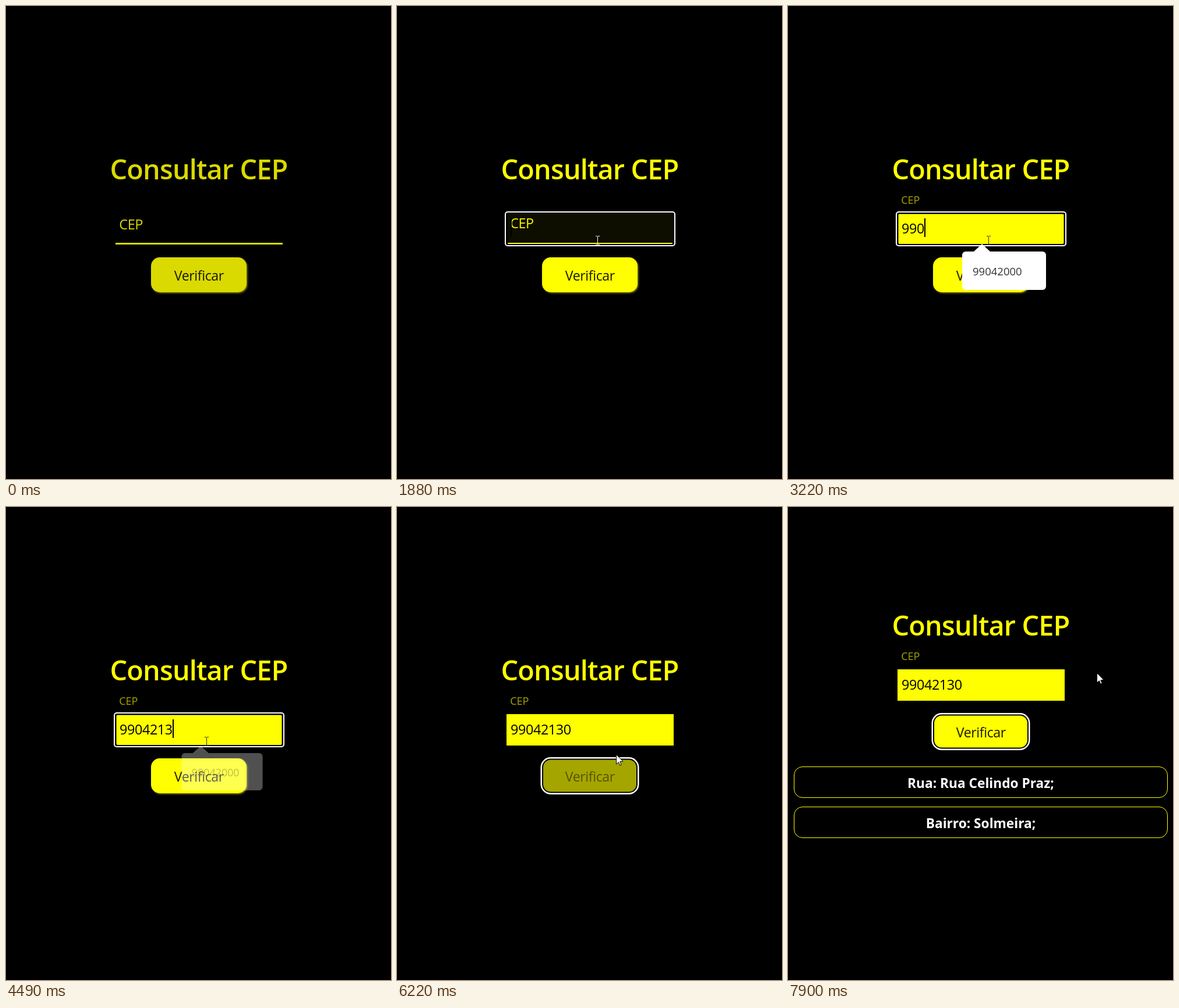
An HTML page with a canvas that plays this animation: 661 by 813 pixels, repeating every 8000 ms.

```html
<!DOCTYPE html>
<html lang="pt-BR">
<head>
<meta charset="utf-8">
<title>Consultar CEP</title>
<style>
  html, body { margin: 0; width: 100%; height: 100%; overflow: hidden; background: #000; }
  canvas { display: block; }
</style>
</head>
<body>
<canvas id="stage" width="661" height="813"></canvas>
<script>
const ctx = document.getElementById('stage').getContext('2d');
const LOOP = 8000;
const FOCUS = 1840, POPUP_OUT = 4350, CLICK = 5900, RESULT1 = 6930, RESULT2 = 7890;
const CODE = '99042130';
const KEYS = [2330, 2470, 3220, 3820, 3960, 4350, 4420, 4950];
const RESULTS = ['Rua: Rua Celindo Praz;', 'Bairro: Solmeira;'];

// pointer path: time, x, y
const PATH = [
  [60, 530, 785], [340, 404, 538], [540, 386, 476], [820, 344, 403],
  [5220, 344, 403], [5560, 350, 445], [6100, 350, 445], [6420, 419, 391],
  [6600, 441, 364], [6720, 462, 324], [6860, 473, 304], [6930, 473, 304], [7300, 530, 285]
];

const clamp = v => Math.min(1, Math.max(0, v));
const mix = (a, b, p) => a + (b - a) * p;
const ramp = (t, from, to) => clamp((t - from) / (to - from));
const yellow = v => `rgb(${v},${v},0)`;

// CSS "ease": cubic-bezier(.25, .1, .25, 1)
function ease(x) {
  let lo = 0, hi = 1;
  for (let i = 0; i < 20; i++) {
    const s = (lo + hi) / 2;
    const bx = .75 * s * (1 - s) ** 2 + .75 * s * s * (1 - s) + s ** 3;
    if (bx < x) lo = s; else hi = s;
  }
  return .3 * lo * (1 - lo) ** 2 + 3 * lo * lo * (1 - lo) + lo ** 3;
}

function text(str, x, y, size, color, { weight = 400, align = 'left', spacing = 0 } = {}) {
  ctx.font = `${weight} ${size}px "Open Sans", "Noto Sans", sans-serif`;
  ctx.letterSpacing = spacing + 'px';
  ctx.textAlign = align;
  ctx.fillStyle = color;
  ctx.fillText(str, x, y);
}

function box(x, y, w, h, r, fill) {
  ctx.beginPath();
  ctx.roundRect(x, y, w, h, r);
  ctx.fillStyle = fill;
  ctx.fill();
}

function pointerAt(t) {
  const i = PATH.findIndex(k => k[0] > t);
  if (i === 0) return null;
  if (i < 0) return PATH[PATH.length - 1].slice(1);
  const [a, b] = [PATH[i - 1], PATH[i]];
  const p = ramp(t, a[0], b[0]);
  return [mix(a[1], b[1], p), mix(a[2], b[2], p)];
}

function drawField(t, bright) {
  const p = ease(ramp(t, FOCUS, FOCUS + 600));
  const focused = t >= FOCUS && t < CLICK;
  if (focused) {
    box(185, 353, 293, 60, 5, '#fff');
    box(187, 355, 289, 56, 3, '#000');
    box(189.5, 357.5, 284, 51, 2, yellow(255 * p));
    box(190, 407, 283, 2, 1, '#ff0');
  } else {
    box(188, 356, 287, 54, 0, yellow(255 * p));
    box(188, 407, 287, 3, 0, yellow(bright));
  }
  text('CEP', 194.3, mix(384, 340, p), mix(23.6, 18, p), yellow(mix(bright, 165, p)),
    { weight: p < .95 ? 500 : 400, spacing: mix(-.5, -.1, p) });

  const count = KEYS.filter(k => k <= t).length;
  const typed = CODE.slice(0, count);
  text(typed, 195, 391, 23.4, '#000', { spacing: -.4 });
  const last = count ? KEYS[count - 1] : FOCUS;
  if (focused && (t - last) % 1060 < 530) {
    ctx.fillRect(Math.round(195 + ctx.measureText(typed).width), 365, 2, 32);
  }
}

function drawButton(t, bright) {
  const passing = ramp(t, 490, 600) * (1 - ramp(t, 690, 820));
  const busy = ease(ramp(t, 5400, 5600)) * (1 - ease(ramp(t, RESULT1, RESULT1 + 500)));
  const dim = Math.max(passing, busy);
  const fill = yellow(mix(bright, 165, dim));
  if (t >= CLICK) {
    box(246.5, 430, 169, 64, 17.5, '#fff');
    box(249, 432.5, 164, 59, 15, '#000');
    box(251, 434.5, 160, 55, 13, fill);
  } else {
    ctx.save();
    ctx.shadowColor = 'rgba(255,255,0,.5)';
    ctx.shadowBlur = 3;
    ctx.shadowOffsetX = ctx.shadowOffsetY = 1.5;
    box(249, 432, 164, 60, 15, yellow(bright));
    ctx.restore();
    box(250, 433, 162, 58, 14, fill);
  }
  text('Verificar', 331.3, 472, 23.2, yellow(mix(25, 85, dim)), { align: 'center', spacing: -.4 });
}

function drawPopup(t) {
  const gone = ramp(t, POPUP_OUT, POPUP_OUT + 250);
  const alpha = ramp(t, FOCUS + 60, FOCUS + 200) * (1 - ease(gone) * .8) * (gone < 1);
  if (!alpha) return;
  const s = 1 - .06 * gone;
  ctx.save();
  ctx.globalAlpha = alpha;
  ctx.translate(371, 455);
  ctx.scale(s, s);
  ctx.translate(-371, -455);
  ctx.beginPath();
  ctx.roundRect(299, 422, 144, 66, 6);
  ctx.moveTo(319, 422);
  ctx.lineTo(333, 409);
  ctx.lineTo(347, 422);
  ctx.fillStyle = '#fff';
  ctx.fill();
  text('99042000', 317, 463, 18.5, '#333');
  ctx.restore();
}

function drawTooltip(t) {
  if (t < 1510 || t >= 1800) return;
  box(356, 423, 198, 38, 0, '#767676');
  box(357, 424, 196, 36, 0, '#fff');
  text('Preencha este campo.', 455, 448, 17.5, '#575757', { align: 'center' });
}

function drawResults(t, rise) {
  RESULTS.forEach((str, i) => {
    if (t < (i ? RESULT2 : RESULT1)) return;
    const y = 523 - rise + 69 * i;
    ctx.beginPath();
    ctx.roundRect(10.5, y + .5, 641, 53, 14.5);
    ctx.strokeStyle = '#ff0';
    ctx.lineWidth = 1;
    ctx.stroke();
    text(str, 331, y + 37, 22.7, '#fff', { weight: 700, align: 'center' });
  });
}

function drawPointer(t, rise) {
  const pos = pointerAt(t);
  if (!pos) return;
  const [x, y] = pos;
  const inside = (l, top, r, b) => x > l && x < r && y > top - rise && y < b - rise;
  const onField = inside(188, 356, 475, 410);
  ctx.save();
  ctx.translate(Math.round(x), Math.round(y));
  if (onField || inside(180, 255, 483, 313)) {
    ctx.fillStyle = onField && t > FOCUS + 200 ? '#333' : '#fff';
    ctx.fillRect(0, -7, 1, 14);
    for (const end of [-8, 7]) {
      ctx.fillRect(-3, end, 3, 1);
      ctx.fillRect(1, end, 3, 1);
    }
  } else {
    ctx.beginPath();
    [[.5, .5], [.5, 17], [4.3, 13.5], [6.8, 19.2], [9.2, 18.2], [6.8, 12.6], [12, 12.2]]
      .forEach(p => ctx.lineTo(...p));
    ctx.closePath();
    ctx.fillStyle = '#fff';
    ctx.fill();
    ctx.strokeStyle = '#000';
    ctx.lineWidth = 1;
    ctx.stroke();
  }
  ctx.restore();
}

function draw(t) {
  const bright = mix(218, 255, ramp(t, 830, 1020));
  // the column stays centred: half of each 69px row plus the 15px margin
  const rows = (t >= RESULT1) + (t >= RESULT2);
  const shift = rows && (69 * rows + 15) / 2;
  const rise = Math.ceil(shift);
  ctx.fillStyle = '#000';
  ctx.fillRect(0, 0, 661, 813);
  ctx.save();
  ctx.translate(0, -rise);
  text('Consultar CEP', 331, 298, 46.8, yellow(bright), { weight: 600, align: 'center', spacing: -.85 });
  drawField(t, bright);
  ctx.translate(0, rise - Math.floor(shift));
  drawButton(t, bright);
  ctx.restore();
  drawPopup(t);
  drawTooltip(t);
  drawResults(t, rise);
  drawPointer(t, rise);
}

const start = performance.now();
function frame() {
  draw((performance.now() - start) % LOOP);
  requestAnimationFrame(frame);
}
frame();
</script>
</body>
</html>
```
